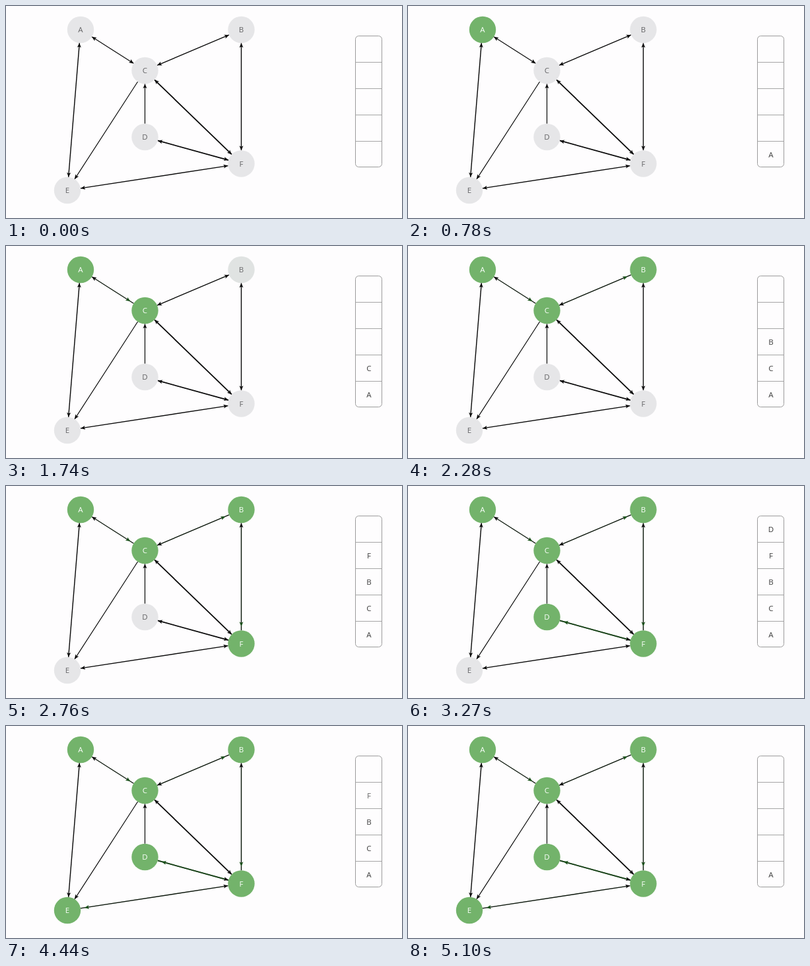
Write an HTML page that moves like this. It is 600 px wide and 322 px high and loops after 5130 ms.

```html
<!DOCTYPE html>
<html lang="en">
<head>
<meta charset="utf-8">
<title>Depth-first search</title>
<style>
  html, body { margin: 0; width: 100%; height: 100%; overflow: hidden; background: #fefdfe; }
  svg { display: block; width: 600px; height: 322px; }
  text { font: 11.5px "Open Sans", "Noto Sans", sans-serif; text-anchor: middle; }
</style>
</head>
<body>
<svg id="stage" viewBox="0 0 600 322"></svg>
<script>
const LOOP = 5130, FADE = 300, SWAP = 100, RADIUS = 20.2;
const GREY = [230, 230, 232], GREEN = [115, 179, 107];
const INK = [100, 100, 102], WHITE = [250, 255, 250];

const nodes = {
  A: [113, 36], B: [356.5, 36], C: [210.5, 98],
  D: [210.5, 199], E: [93, 280], F: [356.5, 239.5]
};

// from, to, line width, arrow at both ends
const edges = [
  ['A', 'C', 1.2, true], ['C', 'B', 1.3, true], ['B', 'F', 1.4, true],
  ['F', 'D', 1.7, true], ['F', 'E', 1.4, true], ['A', 'E', 1.4, true],
  ['C', 'F', 1.8, true], ['C', 'E', 1.2, false], ['D', 'C', 1.2, false]
];

// node, reached from, visit time, push time, pop time, stack slot
const visits = [
  ['A', '', 120, 420, Infinity, 0],
  ['C', 'A', 900, 1200, 4900, 1],
  ['B', 'C', 1700, 1990, 4660, 2],
  ['F', 'B', 2330, 2610, 4420, 3],
  ['D', 'F', 2810, 3090, 3310, 4],
  ['E', 'F', 3440, 3800, 4140, 4]
];

const stage = document.getElementById('stage');

function add(tag, attrs, content = '') {
  const el = document.createElementNS('http://www.w3.org/2000/svg', tag);
  for (const key in attrs) el.setAttribute(key, attrs[key]);
  el.textContent = content;
  return stage.appendChild(el);
}

function addHead(x, y, angle, color) {
  return add('path', {
    d: 'M0 0L-7 -3L-5.4 0L-7 3Z', fill: color,
    transform: `translate(${x} ${y}) rotate(${angle})`
  });
}

const heads = {};
for (const [from, to, width, both] of edges) {
  const [ax, ay] = nodes[from], [bx, by] = nodes[to];
  const turn = Math.atan2(by - ay, bx - ax);
  const angle = turn * 180 / Math.PI;
  const ux = Math.cos(turn), uy = Math.sin(turn);
  const x1 = ax + ux * RADIUS, y1 = ay + uy * RADIUS;
  const x2 = bx - ux * RADIUS, y2 = by - uy * RADIUS;
  const line = { x1, y1, x2, y2, 'stroke-width': width };
  add('line', { ...line, stroke: '#080808' });
  const tint = add('line', { ...line, stroke: '#1f7a1f', opacity: 0 });
  if (both) addHead(x1, y1, angle + 180, '#080808');
  heads[from + to] = {
    plain: addHead(x2, y2, angle, '#080808'),
    used: addHead(x2 - ux * 6, y2 - uy * 6, angle, '#174f17'),
    tint, glow: from + to === 'FD' ? 0.5 : 0.12
  };
  heads[from + to].used.setAttribute('opacity', 0);
}

const discs = {};
for (const name in nodes) {
  const [x, y] = nodes[name];
  discs[name] = {
    disc: add('circle', { cx: x, cy: y, r: 20.2 }),
    label: add('text', { x, y: y + 4 }, name)
  };
}

add('rect', { x: 529.5, y: 45.5, width: 40, height: 199, rx: 5, fill: 'none', stroke: '#9b9b9b' });
for (let y = 85.5; y < 240; y += 40) {
  add('line', { x1: 529.5, y1: y, x2: 569.5, y2: y, stroke: '#a5a5a5' });
}
const slots = visits.map(([name, , , , , slot]) =>
  add('text', { x: 550, y: 229.7 - slot * 40, fill: '#3c3c3c' }, name));

const ramp = (t, start, length) => Math.min(1, Math.max(0, (t - start) / length));
const smooth = p => p * p * (3 - 2 * p);
const mix = (a, b, p) => `rgb(${a.map((v, i) => Math.round(v + (b[i] - v) * p))})`;

function draw(t) {
  visits.forEach(([name, from, visit, push, pop], i) => {
    const p = smooth(ramp(t, visit, FADE));
    discs[name].disc.setAttribute('fill', mix(GREY, GREEN, p));
    discs[name].label.setAttribute('fill', mix(INK, WHITE, p));
    slots[i].setAttribute('opacity', ramp(t, push, SWAP) - ramp(t, pop, SWAP));
    const head = heads[from + name];
    if (!head) return;
    head.plain.setAttribute('opacity', 1 - p);
    head.used.setAttribute('opacity', p);
    head.tint.setAttribute('opacity', p * head.glow);
  });
}

const begin = performance.now();
function tick() {
  draw((performance.now() - begin) % LOOP);
  requestAnimationFrame(tick);
}
draw(0);
requestAnimationFrame(tick);
</script>
</body>
</html>
```
